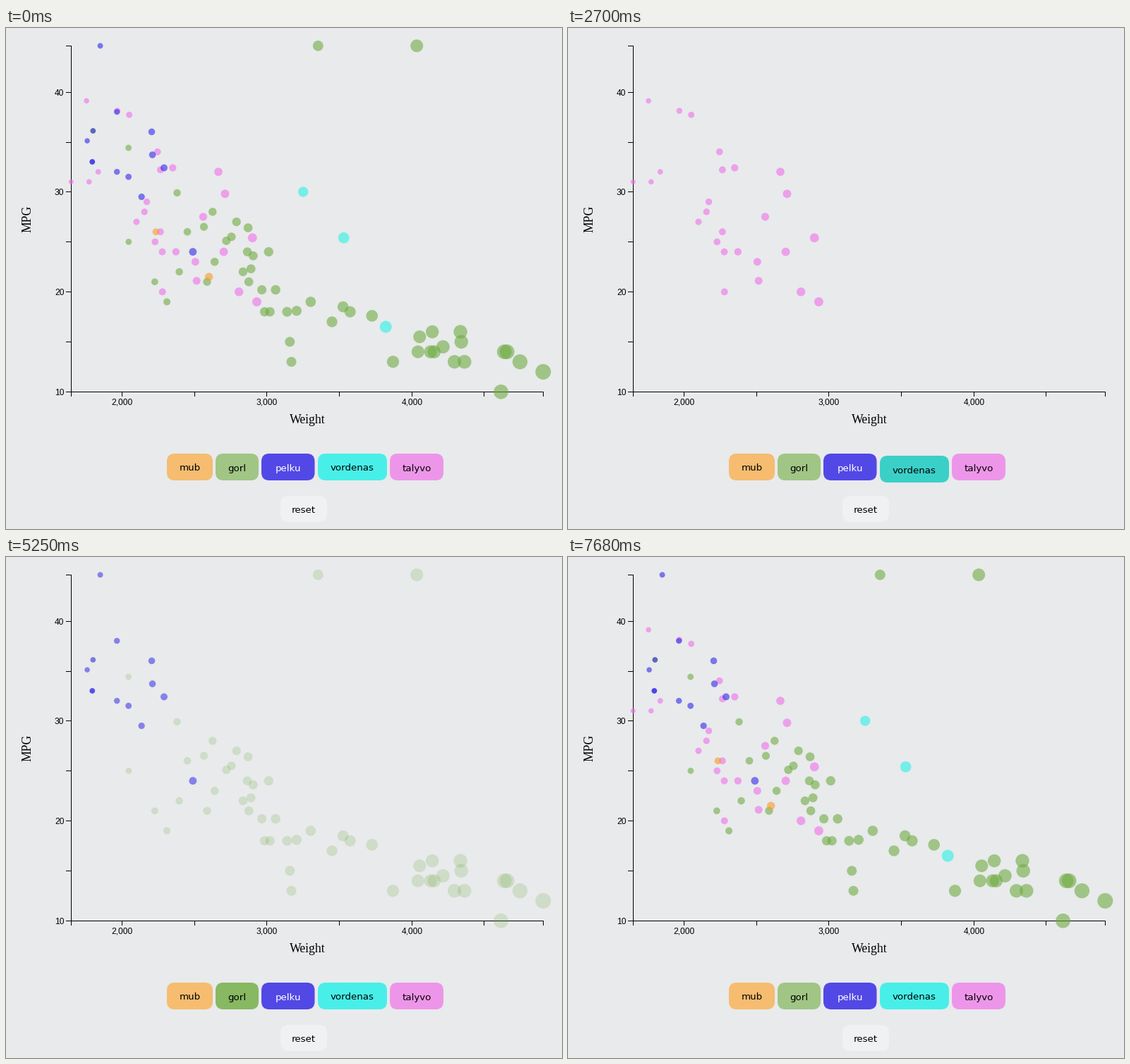
These frames come from a looping animation (788 px wide and 711 px high, 9.03 s). A matplotlib script:

```python
import matplotlib.pyplot as plt
from matplotlib.animation import FuncAnimation
from matplotlib.collections import PatchCollection
from matplotlib.patches import Circle, FancyBboxPatch, Rectangle

W, H, DPI = 788, 711, 64
STEP, FRAMES = 30, 301
LEFT, RIGHT, TOP, BOTTOM = 92, 761, 25, 516
W_MIN, W_MAX, M_MIN, M_MAX = 1649, 4906, 10, 44.6
POINT_ALPHA = 0.6
FADE_IN, FADE_OUT = 200, 300
PRESS_SHIFT = 3

# Cars as (weight, mpg), one list per make.
MUB = [(2234, 26), (2600, 21.5)]
GORL = [
    (3353, 44.6), (4034, 44.6), (1800, 36.1), (2045, 34.4), (2380, 29.9),
    (2625, 28), (2790, 27), (2565, 26.5), (2451, 26), (2870, 26.4),
    (2755, 25.5), (2720, 25.1), (2046, 25), (2865, 24), (2905, 23.6),
    (3012, 24), (2639, 23), (2890, 22.3), (2835, 22), (2395, 22),
    (2875, 21), (2587, 21), (2226, 21), (2310, 19), (2965, 20.2),
    (3060, 20.2), (2984, 18), (3021, 18), (3139, 18), (3205, 18.1),
    (3302, 19), (3449, 17), (3525, 18.5), (3574, 18), (3725, 17.6),
    (3158, 15), (3169, 13), (3870, 13), (4042, 14), (4054, 15.5),
    (4141, 16), (4129, 14), (4154, 14), (4215, 14.5), (4294, 13),
    (4335, 16), (4341, 15), (4363, 13), (4638, 14), (4657, 14),
    (4746, 13), (4615, 10), (4906, 12),
]
PELKU = [
    (1850, 44.6), (1965, 38), (1800, 36.1), (1760, 35.1), (1795, 33),
    (1795, 33), (2205, 36), (2210, 33.7), (1965, 32), (2045, 31.5),
    (2290, 32.4), (2135, 29.5), (2489, 24),
]
VORDENAS = [(3250, 30), (3530, 25.4), (3820, 16.5)]
TALYVO = [
    (1649, 31), (1773, 31), (1836, 32), (1755, 39.1), (1968, 38.1),
    (2050, 37.7), (2245, 34), (2265, 32.2), (2350, 32.4), (2665, 32),
    (2711, 29.8), (2171, 29), (2155, 28), (2100, 27), (2560, 27.5),
    (2265, 26), (2228, 25), (2278, 24), (2372, 24), (2506, 23),
    (2515, 21.1), (2279, 20), (2702, 24), (2900, 25.4), (2807, 20),
    (2930, 19),
]

# label, cars, point colour, button colour, hover colour, text colour, x0, x1, z
MAKES = [
    ("mub", MUB, "#f99a25", "#f6bc70", "#eba44a", "black", 228, 293, 5),
    ("gorl", GORL, "#70ac43", "#a0c585", "#88b862", "black", 297, 358, 4),
    ("pelku", PELKU, "#3128e8", "#5248e6", "#4038b8", "white", 362, 437.5, 7),
    ("vordenas", VORDENAS, "#29f1e5", "#48efe8", "#3ad0c8", "black", 442, 540, 6),
    ("talyvo", TALYVO, "#f06fea", "#ed96e9", "#f07fea", "black", 544, 620, 3),
]
RESET = len(MAKES)

# (time, hovered button)
HOVERS = [(0, None), (1140, 4), (1980, 3), (2070, None), (2340, 3), (3360, 2),
          (4680, 1), (6030, None), (6060, 0), (6870, None)]
# (mouse down, mouse up, button)
CLICKS = [(1410, 1430, 4), (2700, 2775, 3), (3870, 3945, 2),
          (5100, 5161, 1), (6240, 6360, 0), (7380, 7490, RESET)]


def x_pos(weight):
    return LEFT + 0.3 + (weight - W_MIN) / (W_MAX - W_MIN) * (RIGHT - LEFT)


def y_pos(mpg):
    return BOTTOM + 0.3 - (mpg - M_MIN) / (M_MAX - M_MIN) * (BOTTOM - TOP)


def radius(weight):
    return 3.5 + 7.5 * (weight - W_MIN) / (W_MAX - W_MIN)


def ease(p):
    """Cubic in-out."""
    p = min(max(p, 0), 1)
    return 4 * p ** 3 if p < 0.5 else 1 - 4 * (1 - p) ** 3


fig = plt.figure(figsize=(W / DPI, H / DPI), dpi=DPI, facecolor="#e8eaec")
ax = fig.add_axes([0, 0, 1, 1])
ax.set(xlim=(0, W), ylim=(H, 0))
ax.axis("off")


def text(x, y, s, px, font, **kw):
    kw = {"ha": "center", "va": "baseline", "zorder": 10, **kw}
    return ax.text(x, y, s, fontsize=px * 72 / DPI, family=font, **kw)


def bar(x, y, w, h):
    ax.add_patch(Rectangle((x, y), w, h, fc="black", lw=0, antialiased=False))


def draw_axes():
    bar(LEFT, TOP, 1, BOTTOM - TOP + 1)
    bar(LEFT, BOTTOM, RIGHT - LEFT + 1, 1)
    for mpg in (M_MAX, *range(10, 45, 5)):
        y = round(y_pos(mpg))
        bar(LEFT - 7, y, 7, 1)
        if mpg % 10 == 0:
            text(82.5, y + 5, str(mpg), 12, "Liberation Sans", ha="right")
    for weight in (W_MIN, *range(2000, 5000, 500), W_MAX):
        if weight == 2000 or weight % 500 == 0 or weight in (W_MIN, W_MAX):
            x = int(x_pos(weight))
            bar(x, BOTTOM, 1, 7)
            if weight % 1000 == 0:
                text(x + 0.5, 534, f"{weight:,}", 12, "Liberation Sans")
    text(427, 561, "Weight", 17.6, "Liberation Serif")
    text(39, 270.5, "MPG", 17.6, "Liberation Serif",
         rotation=90, ha="right", va="center")


class Button:
    def __init__(self, label, x0, x1, y, h, base, hover, ink):
        self.y, self.base_y = y, y + h / 2 + 5.5
        self.base, self.hover = base, hover
        self.box = FancyBboxPatch((x0, y), x1 - x0, h, fc=base, lw=0, zorder=9,
                                  boxstyle="round,pad=0,rounding_size=11")
        ax.add_patch(self.box)
        self.label = text((x0 + x1) / 2, self.base_y, label, 13.33,
                          "DejaVu Sans", color=ink)

    def show(self, hovered, pressed):
        shift = PRESS_SHIFT if pressed else 0
        self.box.set_facecolor(self.hover if hovered else self.base)
        self.box.set_y(self.y + shift)
        self.label.set_y(self.base_y + shift)


def make_points(cars, color, z):
    dots = PatchCollection(
        [Circle((x_pos(w), y_pos(m)), radius(w)) for w, m in cars],
        facecolors=color, edgecolors="none", linewidths=0, zorder=z)
    return ax.add_collection(dots, autolim=False)


draw_axes()
points, buttons = [], []
for name, cars, dot, base, hover, ink, x0, x1, z in MAKES:
    points.append(make_points(cars, dot, z))
    buttons.append(Button(name, x0, x1, 604, 38, base, hover, ink))
buttons.append(Button("reset", 389, 455, 664, 37, "#f0f1f2", "#f0f1f2", "black"))


def visibility(make, t):
    """Share of full opacity of one make at time t."""
    level, shown = 1, True
    for _, up, pick in CLICKS:
        if t < up:
            break
        keep = pick in (make, RESET)
        if keep and not shown:
            level = ease((t - up) / FADE_IN)
        elif shown and not keep:
            level = 1 - ease((t - up) / FADE_OUT)
        shown = keep
    return level


def draw(i):
    t = i * STEP
    hovered = [b for start, b in HOVERS if start <= t][-1]
    pressed = next((b for down, up, b in CLICKS if down <= t < up), None)
    for k, dots in enumerate(points):
        level = visibility(k, t)
        dots.set_visible(level > 0)
        dots.set_alpha(POINT_ALPHA * level)
    for k, button in enumerate(buttons):
        button.show(k == hovered, k == pressed)
    return points


anim = FuncAnimation(fig, draw, frames=FRAMES, interval=STEP,
                     repeat=True, repeat_delay=0, blit=False)
plt.show()
```
